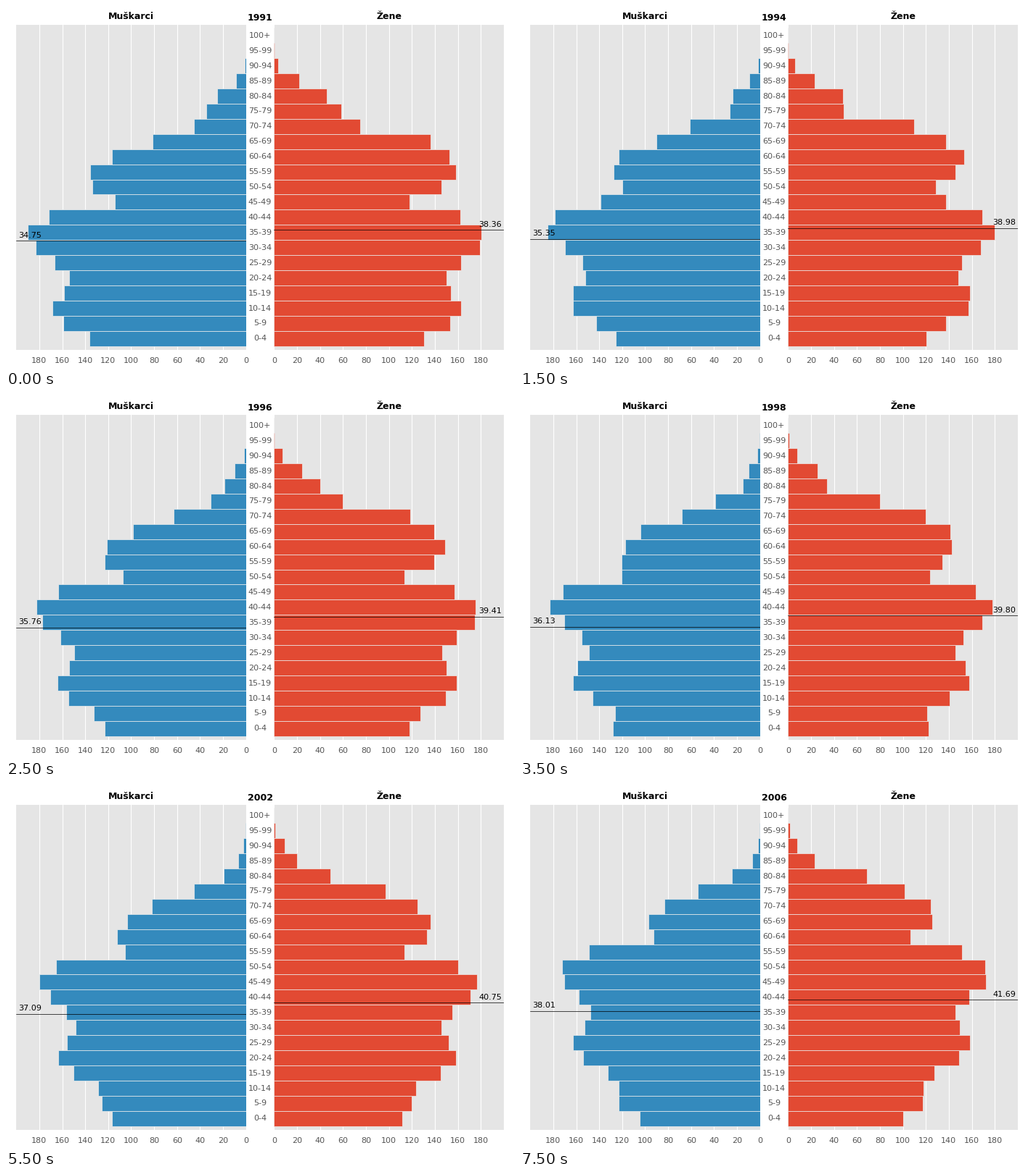
Write a matplotlib script that moves like this. It is 700x500 px and loops after 8 s.

```python
import numpy as np
import matplotlib.pyplot as plt
from matplotlib.animation import FuncAnimation

W, H, DPI = 700, 500, 100
BLUE, RED = "#348ABD", "#E24A33"
PANEL, EDGE, GREY = "#E5E5E5", "#EEEEEE", "#555555"
FIRST, LAST = 1991, 2006
TOP, BOTTOM, WIDTH = 25.6, 474.6, 316.5
YLIM = (-0.73, 20.72)
ROWS = np.arange(21)
AGES = [f"{a}-{a + 4}" for a in range(0, 100, 5)] + ["100+"]

# Peaks and troughs of female births: year, thousands per five years
BIRTHS = [(1894, 10), (1906, 95), (1911.5, 108), (1916.5, 76), (1924, 156),
          (1932, 166), (1940, 146), (1944, 117), (1950.5, 166), (1955.5, 180),
          (1970.5, 146), (1979.5, 159), (1993.5, 118), (1997, 123.5), (2003, 100)]
# Women per man by year of birth
RATIO = [(1909, 0.88), (1917, 1.1), (1924, 1.33), (1930, 1.08),
         (1944, 0.99), (1950, 0.905), (1960, 0.975), (2004, 0.953)]
# Median age: year, men, women
MEDIAN = [(1991, 34.75, 38.36), (1994, 35.35, 38.98), (1996, 35.76, 39.41),
          (1998, 36.13, 39.80), (2000, 36.61, 40.28), (2004, 37.57, 41.23),
          (2006, 38.01, 41.69)]


def births(year):
    """Cosine easing from one turning point to the next."""
    years, sizes = zip(*BIRTHS)
    steps = np.arange(len(years))
    pos = np.interp(year, years, steps)
    whole = np.floor(pos)
    eased = whole + (1 - np.cos(np.pi * (pos - whole))) / 2
    return np.interp(eased, steps, sizes)


def survival(age, scale, growth):
    """Gompertz law."""
    return np.exp(-scale * np.exp(growth * (age - 62)))


def population(year, female):
    age = 5 * ROWS + 2
    born = year - age
    migration = np.interp(year, [1991, 1996], [1.025, 1])
    if female:
        alive = births(born) * survival(age, 0.0909, 0.11)
    else:
        alive = births(born) / np.interp(born, *zip(*RATIO)) * survival(age, 0.246, 0.0925)
    return alive * migration


fig = plt.figure(figsize=(W / DPI, H / DPI), dpi=DPI, facecolor="white")


def row_y(row):
    """Pixel height, from the top, of a position on the age axis."""
    return BOTTOM - (row - YLIM[0]) / (YLIM[1] - YLIM[0]) * (BOTTOM - TOP)


def put(x, y, text, **style):
    return fig.text(x / W, 1 - y / H, text, va="baseline", **style)


class Side:
    def __init__(self, female, left, xlim, title, color, label_x, align):
        self.female = female
        ax = fig.add_axes([left / W, 1 - BOTTOM / H, WIDTH / W, (BOTTOM - TOP) / H],
                          facecolor=PANEL)
        ax.set_axisbelow(True)
        ax.grid(axis="x", color="white", lw=0.8)
        ax.spines[:].set_visible(False)
        ax.set_title(title, fontsize=9, fontweight="bold", pad=5.7)
        ax.set_xticks(range(0, 200, 20))
        ax.set_yticks([])
        ax.tick_params(axis="x", length=0, pad=7.7, labelsize=8, labelcolor=GREY)
        self.bars = ax.barh(ROWS, population(FIRST, female), height=1,
                            color=color, edgecolor=EDGE, lw=0.5)
        self.line = ax.axhline(0, color="black", lw=0.5)
        self.label = put(label_x, 0, "", ha=align, fontsize=8, color="black")
        ax.set_xlim(xlim)
        ax.set_ylim(YLIM)

    def show(self, year):
        for bar, size in zip(self.bars, population(year, self.female)):
            bar.set_width(size)
        years, *medians = zip(*MEDIAN)
        median = np.interp(year, years, medians[self.female])
        y = median / 5 - 0.5
        self.line.set_ydata([y, y])
        self.label.set_y(1 - (row_y(y) - 4.6) / H)
        self.label.set_text(f"{median:.2f}")


sides = [
    Side(False, 14.2, (200, 0), "Muškarci", BLUE, 17.1, "left"),
    Side(True, 369.3, (0, 200), "Žene", RED, 682.9, "right"),
]
for row, age in zip(ROWS, AGES):
    put(350, row_y(row) + 3.1, age, ha="center", fontsize=8, color=GREY)
year_label = put(350.2, 19.8, "", ha="center", fontsize=9, fontweight="bold")


def update(i):
    year = FIRST + i
    year_label.set_text(str(year))
    for side in sides:
        side.show(year)
    return []


anim = FuncAnimation(fig, update, frames=LAST - FIRST + 1, interval=500,
                     repeat=True, repeat_delay=0, blit=False)
plt.show()
```
